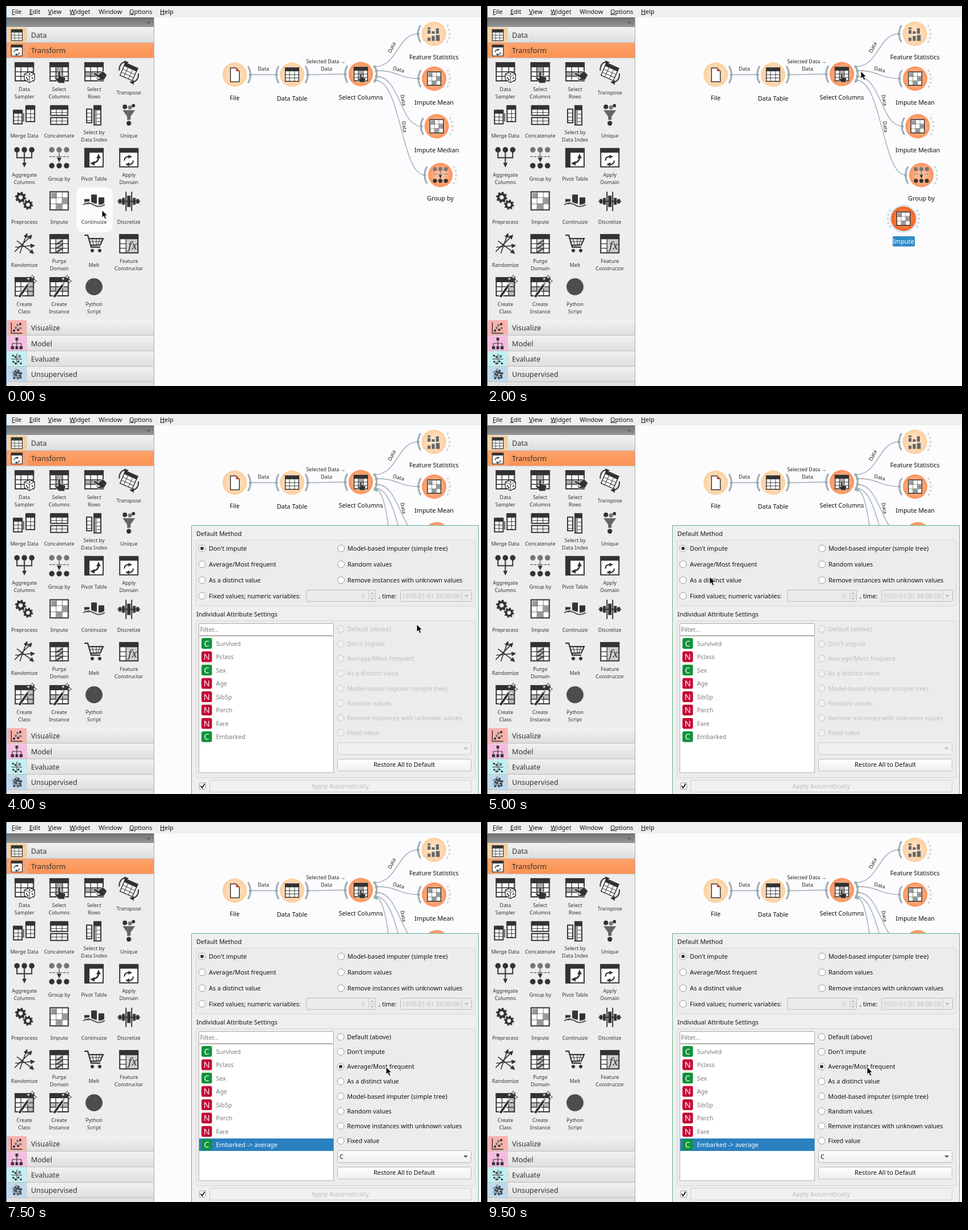
An HTML page for the animation above (10 s loop, 836 px wide and 670 px high).

```html
<!DOCTYPE html>
<html lang="en">
<head>
<meta charset="utf-8">
<title>Imputing a column in a workflow</title>
<style>
html, body { margin: 0; width: 100%; height: 100%; overflow: hidden; background: #fcfcfe; }
svg { display: block; width: 100vw; height: 100vh; }
text { font-family: "Noto Sans", "Open Sans", sans-serif; font-size: 10.86px; white-space: pre; }
.s { font-size: 9px; }
.cat { font-size: 12.6px; }
.m { text-anchor: middle; }
</style>
</head>
<body>
<svg id="stage" viewBox="0 0 836 670"></svg>
<script>
const K = '#333', GREY = '#9cacb4', OFF = '#bebebe', BLUE = '#308cc6';

const rect = (x, y, w, h, fill, more = '') => `<rect x="${x}" y="${y}" width="${w}" height="${h}" fill="${fill}" ${more}/>`;
const dot = (x, y, r, fill = K, more = '') => `<circle cx="${x}" cy="${y}" r="${r}" fill="${fill}" ${more}/>`;
const line = (d, stroke = K, w = 1, more = '') => `<path d="${d}" fill="none" stroke="${stroke}" stroke-width="${w}" ${more}/>`;
const shape = (d, fill = K, more = '') => `<path d="${d}" fill="${fill}" ${more}/>`;
const text = (x, y, s, fill = '#111', cls = '', more = '') => `<text x="${x}" y="${y}" fill="${fill}" class="${cls}" ${more}>${s}</text>`;
const put = (x, y, s, t = '') => `<g transform="translate(${x} ${y}) ${t}">${s}</g>`;
const group = (id, s) => `<g id="${id}">${s}</g>`;
const grad = (id, a, b, type = 'linear', dir = 'x2="0" y2="1"') =>
  `<${type}Gradient id="${id}" ${dir}><stop stop-color="${a}"/><stop offset="1" stop-color="${b}"/></${type}Gradient>`;

// Icons are drawn around the origin, about 34 px wide
const table = (inner = '', grid = 'M-16 0H16M-16 8H16M-6-8V16M6-8V16') =>
  rect(-16, -16, 32, 32, '#fff') + inner + line(grid, K, 1.3) +
  line('M-16-16H16V16H-16Z', K, 2) + rect(-17, -17, 34, 9, K);
const hand = shape('M-2-8q2-2 4 0v8l7 2q3 1 2 4l-2 7h-10l-7-9q0-3 3-1l3 2z', K, 'stroke="#fff" stroke-width=".7"');
const tip = (x, y, a) => put(x, y, shape('M0 0l-4-8h8z'), `rotate(${a})`);
const swap = line('M-9 1q0-9 10-8', K, 2.6) + tip(7, -7, -90) + line('M9 1q0 9-10 8', K, 2.6) + tip(-7, 9, 90);
const frame = rect(-16, -16, 32, 32, '#fff', `stroke="${K}" stroke-width="2"`) + rect(-17, -17, 34, 8, K);
const wand = line('M-9 18L9-7', '#fff', 6) + line('M-9 18L6-3', K, 4) + line('M6-3l3-4', '#999', 4) +
  [[7, -14], [14, -17], [18, -10]].map(([x, y]) => put(x, y, shape('M0-4L1-1 4 0 1 1 0 4-1 1-4 0-1-1z', '#fff', `stroke="${K}" stroke-width=".8"`))).join('');
const gear = (r) => dot(0, 0, r, 'none', `stroke="${K}" stroke-width="${r * .7}"`) +
  dot(0, 0, r * 1.45, 'none', `stroke="${K}" stroke-width="${r * .5}" stroke-dasharray="${r * .57}"`);
const three = (y, fill = K) => [-13, 0, 13].map(x => dot(x, y, 4.8, fill)).join('');
const bars = (list, fill = K) => list.map(([x, y, w, h]) => rect(x, y, w, h, fill)).join('');
const cells = (list) => list.map(([x, y]) => rect(x, y, 10, 10, '#999')).join('');

const icons = {
  table: table(),
  sampler: table() + put(9, 9, shape('M0-9L9-5V5L0 10-9 5V-5Z', '#fff', `stroke="${K}" stroke-width="1.4"`) +
    line('M-9-5L0-1 9-5M0-1V10', K, 1) + dot(0, -5, 1.4) + dot(-5, 2, 1.4) + dot(-3, 5, 1.4) + dot(5, 2, 1.4)),
  columns: table(rect(-6, -8, 12, 24, '#aaa')) + put(0, 7, hand),
  rows: table(rect(-16, 0, 32, 8, '#aaa')) + put(7, 7, hand, 'rotate(-60)'),
  transpose: put(0, 0, table(), 'rotate(24) scale(.74)') + line('M-17-2q0-15 13-16M17 3q0 14-12 16', K, 2) + tip(0, -17, -100) + tip(1, 18, 95),
  merge: rect(-19, -6, 15, 22, '#fff', `stroke="${K}" stroke-width="2"`) + rect(-20, -9, 17, 7, K) + line('M-11-3V16M-19 4H-4M-19 10H-4') +
    rect(3, -14, 15, 26, '#fff', `stroke="${K}" stroke-width="2"`) + rect(2, -17, 17, 8, K) + line('M11-9V12M3-2H18M3 5H18') + rect(-4, -3, 4, 15, '#777'),
  concat: rect(-15, -13, 30, 14, '#fff', `stroke="${K}" stroke-width="2"`) + rect(-16, -17, 32, 8, K) + line('M-5-9V1M5-9V1M-15-4H15') +
    rect(-15, 5, 30, 12, '#fff', `stroke="${K}" stroke-width="2"`) + line('M-5 5V17M5 5V17M-15 11H15'),
  index: rect(-13, -10, 9, 24, '#fff', `stroke="${K}" stroke-width="2"`) + line('M-13-3H-4M-13 4H-4M-13 10H-4') +
    rect(-1, -17, 14, 9, K) + rect(0, -9, 12, 27, '#fff', `stroke="${K}" stroke-width="2"`) + rect(1, -8, 4, 25, '#999') + line('M5-1H12M5 6H12M5 12H12'),
  unique: shape('M-11-8H11L3 3V9H-3V3Z', '#666') + dot(-7, -14, 4) + dot(2, -13, 3.6, '#777') + dot(8, -16, 3) + dot(0, 15, 4.2),
  aggregate: three(-14) + line('M-13-10V0H13V-10M0-10V12', K, 2) + tip(0, 17, 0),
  group: three(-14, '#777') + line('M-17-2H17', '#777', 1.6, 'stroke-dasharray="4 2"') + line('M0-9V4', '#777', 1.8) + tip(0, 8, 0) + three(14),
  pivot: frame + rect(-17, -17, 9, 34, K) + line('M-4 10Q9 8 8-3', K, 2.6) + tip(8, -7, 180) + tip(-7, 10, 90),
  domain: frame + put(0, 4, swap, 'scale(.85)'),
  gears: put(-6.5, -6, gear(5.8)) + put(6.5, 7, gear(5.2)),
  impute: rect(-16, -16, 32, 32, '#fff') + cells([[-14, -14], [5, -5], [-5, 5]]) + line('M-5.5-16V16M5.5-16V16M-16-5.5H16M-16 5.5H16', '#777') + line('M-16-16H16V16H-16Z', K, 2),
  continuize: bars([[-17, -3, 9, 9], [-5, -11, 10, 16], [8, -6, 10, 13]]) + line('M-19 5Q-10-1-1 5T19 5', '#eee', 2) + line('M-19 7Q-10 1-1 7T19 7', '#555', 2),
  discretize: bars([[-20, 0, 40, 2], [-18, -3, 5, 8], [-12, -5, 5, 12], [-6, -16, 2, 34], [-3, -9, 6, 20], [4, -16, 2, 34], [7, -5, 5, 12], [13, -3, 5, 8]]),
  random: line('M-17 14L12-14M-13-5L15 16M-16 6L16 3M-8 17L4-17', K, 1.6) + tip(14, -16, 225) + tip(17, 18, -48) + tip(19, 3, -95) + tip(5, -19, 200),
  purge: table(rect(-5, -8, 11, 24, '#ddd') + line('M-5 1L6-6M-5 8L6 1M-5 15L6 8', '#555', 3)),
  melt: line('M-17-15h6l6 21H11M-9-9H16L11 2-6 3', K, 2.2) + line('M-3-8L-1 2M4-8V2M10-8L7 2M-8-4H14', K, 1) + dot(-3, 12, 3) + dot(10, 12, 3),
  formula: table(rect(-5, -8, 22, 25, '#ccc'), 'M-16 0H-5M-16 8H-5M-5-8V16') +
    text(-1, 10, 'fx', K, '', 'style="font:italic 18px Noto Serif,serif"'),
  newClass: table(rect(5, -8, 11, 24, '#bbb')) + wand,
  newInstance: table(rect(-16, 0, 32, 8, '#bbb')) + wand,
  script: dot(0, 0, 15, '#4d4d4d'),
  file: shape('M-10-16H3L11-8V17H-10Z', '#fff', `stroke="${K}" stroke-width="2"`) + shape('M3-16V-8H11Z', '#c44'),
  stats: bars([[-15, -15, 7, 4], [-15, -9, 7, 9], [-5, -6, 7, 6], [5, -13, 7, 13], [-15, 9, 7, 8], [-5, 5, 7, 12], [5, 3, 9, 14]], '#666'),
  scatter: line('M-16-16V16H16', K, 2.5) + [[-8, 8], [-3, 0], [4, 6], [2, -8], [10, -11], [11, 1]].map(([x, y], i) => dot(x, y, 3.6, i % 2 ? '#777' : K)).join(''),
  tree: line('M0-12V0M-13 10V0H13V10M0 0V10', K, 1.8) + bars([[-4, -17, 8, 8], [-17, 8, 9, 9], [-4, 8, 8, 9], [8, 8, 9, 9]]),
  matrix: line('M-16 0H16M0-16V16', K, 1.6) + [[-11, -10], [-4, -6], [-10, 8], [-4, 13], [5, 7], [12, 13]].map(([x, y]) => dot(x, y, 3)).join('') + line('M4-12l8 8M12-12l-8 8', K, 2),
  cluster: Array.from({ length: 17 }, (_, i) => dot(3.6 * Math.sqrt(i) * Math.cos(i * 2.4), 3.6 * Math.sqrt(i) * Math.sin(i * 2.4), 3.4, i % 3 ? '#444' : '#8199ad')).join('')
};
const icon = (name, x, y, k = 1) => put(x, y, icons[name], `scale(${k})`);

// Toolbox
const tools = [
  ['sampler', 'Data|Sampler'], ['columns', 'Select|Columns'], ['rows', 'Select|Rows'], ['transpose', 'Transpose'],
  ['merge', 'Merge Data'], ['concat', 'Concatenate'], ['index', 'Select by|Data Index'], ['unique', 'Unique'],
  ['aggregate', 'Aggregate|Columns'], ['group', 'Group by'], ['pivot', 'Pivot Table'], ['domain', 'Apply|Domain'],
  ['gears', 'Preprocess'], ['impute', 'Impute'], ['continuize', 'Continuize'], ['discretize', 'Discretize'],
  ['random', 'Randomize'], ['purge', 'Purge|Domain'], ['melt', 'Melt'], ['formula', 'Feature|Constructor'],
  ['newClass', 'Create|Class'], ['newInstance', 'Create|Instance'], ['script', 'Python|Script']
];
const toolPos = (i) => [32.3 + 61.3 * (i % 4), 116 + 75.8 * Math.floor(i / 4)];
const tool = ([name, label], i) => {
  const [x, y] = toolPos(i), lines = label.split('|');
  return icon(name, x, y) + lines.map((s, n) => text(x, y + 40.3 + (n - (lines.length - 1) / 2) * 13, s, K, 's m')).join('');
};
const category = (y, name, label, tile, fill = 'url(#row)') =>
  rect(1, y, 259, 27, fill) + rect(2, y, 34, 26, tile) + line(`M1 ${y + 26.5}H260`, '#bdbdbd') +
  line(`M36.5 ${y}V${y + 26}`, '#c9c9c9', .7) + icon(name, 19, y + 13.5, .6) + text(44, y + 18, label, K, 'cat');

const menu = [[10, 'File', 1], [41, 'Edit', 1], [74, 'View', 1], [112, 'Widget', 1], [163, 'Window', 0], [217, 'Options', 1], [271, 'Help', 1]]
  .map(([x, s, u]) => text(x, 13.5, u ? `<tspan text-decoration="underline">${s[0]}</tspan>${s.slice(1)}` : s)).join('');

const toolbox = rect(0, 0, 836, 20, '#efefef') + menu +
  rect(0, 20, 261, 650, '#ededed') + rect(1, 20, 259, 17, 'url(#bar)') + text(248, 32, '«', '#444') +
  category(38, 'table', 'Data', '#f9cf9e') + category(65, 'domain', 'Transform', '#fda268', 'url(#orange)') +
  group('hover', rect(-32, -24, 64, 79, '#fcfcfc', 'rx="10"')) + tools.map(tool).join('') +
  category(554, 'scatter', 'Visualize', '#f9b2ac') + category(581.5, 'tree', 'Model', '#f6bce2') +
  category(609, 'matrix', 'Evaluate', '#c2f1f1') + category(636, 'cluster', 'Unsupervised', '#bfd9ee') +
  rect(1, 663, 259, 7, '#e2e2e2') + line('M260.5 20V670', '#aaa') + line('M.5 0V670', '#2c5375');

// Workflow canvas
const arc = (side, dotted) => {
  const d = `M${side * 24} -14A28 28 0 0 ${side > 0 ? 1 : 0} ${side * 24} 14`;
  return dotted ? line(d, '#d3d7db', 4, 'stroke-dasharray="0 7.3" stroke-linecap="round"') : line(d, GREY, 3, 'stroke-linecap="round"');
};
const node = (x, y, name, label, paint, left, right, ly = 45.5) =>
  put(x, y, (left ? arc(-1, left > 1) : '') + (right ? arc(1, right > 1) : '') + dot(0, 0, 21.5, `url(#${paint})`) +
    icon(name, 0, 0, .74) + (label ? text(0, ly, label, '#111', 'm') : ''));
const link = (x1, y1, x2, y2) => {
  const c = (x1 + x2) / 2 + 2;
  return line(`M${x1} ${y1}C${c} ${y1} ${c} ${y2} ${x2} ${y2}`, GREY, 1.4) + dot(x1, y1, 2.6, GREY) + dot(x2, y2, 2.6, GREY);
};
const tag = (x, y, a, s = 'Data') => put(x, y, text(0, 3, s, '#222', 's m'), `rotate(${a})`);

const canvas = rect(261, 20, 575, 650, '#fcfcfe') +
  link(430, 121, 476, 121) + link(531, 121, 597, 120) + link(649, 107, 725, 49) + link(652, 114, 726, 128) +
  link(652, 124, 731, 212) + link(650, 131, 737, 298) +
  tag(453, 111, 0) + tag(563, 98, 0, 'Selected Data →') + tag(564, 111, 0) +
  tag(679, 73, -63) + tag(691, 112, 16) + tag(699, 166, 79) + tag(701, 213, 82) +
  node(402.5, 121, 'file', 'File', 'pale', 0, 1, 44.5) + node(503.5, 121, 'table', 'Data Table', 'pale', 1, 1) +
  node(624.5, 120, 'columns', 'Select Columns', 'deep', 1, 1, 44.5) + node(753, 49, 'stats', 'Feature Statistics', 'pale', 1, 2, 44.5) +
  node(753.5, 128, 'impute', 'Impute Mean', 'deep', 1, 2) + node(758, 212, 'impute', 'Impute Median', 'deep', 1, 2) +
  node(764.5, 298, 'group', 'Group by', 'deep', 1, 2, 44.5) +
  group('drag', '') +
  group('added', dot(733, 375, 26, 'url(#glow)') + node(733, 375, 'impute', '', 'hot', 2, 2) +
    rect(714, 406, 39, 18, BLUE, 'rx="2"') + text(733, 419, 'Impute', '#fff', 'm')) +
  group('joined', put(733, 375, arc(-1)) + link(652, 134, 705, 377) + tag(671, 256, 84));

// Settings dialog
const methods = ["Don't impute", 'Average/Most frequent', 'As a distinct value', 'Model-based imputer (simple tree)', 'Random values', 'Remove instances with unknown values'];
const radio = (x, y, s, on, enabled = true) =>
  dot(x, y, 6, enabled ? '#fff' : '#f0f0f0', `stroke="${enabled ? '#999' : '#c4c4c4'}"`) + (on ? dot(x, y, 3, '#333') : '') +
  text(x + (x < 400 ? 12 : 11.3), y + 4, s, enabled ? '#111' : OFF);
const box = (x, y, w, h, fill, stroke = '#bcbcbc', r = 2) => rect(x + .5, y + .5, w, h, fill, `stroke="${stroke}" rx="${r}"`);
const arrow = (x, y, fill = OFF, k = 1) => shape(`M${x - 4} ${y - 2 * k}h8l-4 ${4 * k}z`, fill);
const attrs = ['Survived', 'Pclass', 'Sex', 'Age', 'SibSp', 'Parch', 'Fare', 'Embarked'];
const attrRow = (name, i) => {
  const y = 404.5 + 23.5 * i, cat = 'CN'[/Survived|Sex|Embarked/.test(name) ? 0 : 1];
  return rect(344, y - 9.5, 18.5, 19, cat === 'C' ? '#11923c' : '#c20a35', 'rx="3"') +
    text(353.2, y + 5.2, cat, '#fff', 'm', 'style="font-size:14.5px"') +
    text(369.5, y + 4, name, '#7d7d76', '', `id="attr${i}"`);
};

const dialog = rect(326.5, 196.5, 505, 480, '#efefef', 'stroke="#62b487"') +
  text(335, 215, 'Default Method') + box(334, 222, 491, 116, '#ececec', '#d4d4d4') +
  methods.slice(0, 3).map((s, i) => radio(345, 237 + 28 * i, s, !i)).join('') +
  methods.slice(3).map((s, i) => radio(589.7, 237 + 28 * i, s)).join('') +
  radio(345, 320.5, 'Fixed values; numeric variables:') +
  box(528, 310, 122, 20, '#ebebeb') + line('M638.5 311V330M638.5 320.5H650', '#ccc') + arrow(644.5, 316, OFF, -.8) + arrow(644.5, 326, OFF, .8) +
  text(632, 325, '0', OFF, '', 'text-anchor="end"') + text(656, 324.5, ', time:') +
  box(694, 310, 125, 20, '#ebebeb') + text(697, 325, '1970-01-01 08:00:00', OFF) + line('M802.5 311V330', '#ccc') + arrow(810.5, 321) +
  text(335, 357, 'Individual Attribute Settings') + box(334, 364, 491, 277, '#ececec', '#d4d4d4') +
  box(339, 369, 237, 21, '#fff', '#aaa', 1) + text(341.5, 384, 'Filter...', '#777') +
  box(339, 391, 237, 241, '#fff', '#b4b4b4', 0) + group('picked', rect(340, 558, 236.5, 22, '#2b80c0')) + attrs.map(attrRow).join('') +
  group('options', '') +
  box(583, 608, 235, 21, 'url(#button)') + text(701, 622, 'Restore All to Default', '#111', 'm') +
  box(340, 650, 11, 11, '#fff', '#999', 1) + line('M342.5 655.5l2.7 3.5 4.5-7', '#111', 1.8) +
  box(358, 645, 460, 21, '#f0f0f0', '#cdcdcd') + text(588, 660, 'Apply Automatically', OFF, 'm');

const options = (choice) => {
  const on = choice >= 0;
  return ['Default (above)', ...methods, 'Fixed value'].map((s, i) => radio(589, 379 + 26.15 * i, s, i === choice, on)).join('') +
    box(583, 579, 235, 21, on ? 'url(#button)' : '#f0f0f0', on ? '#b4b4b4' : '#cdcdcd') + arrow(809, 590, on ? '#555' : OFF) + (on ? text(587, 594, 'C') : '');
};

const $ = (id) => document.getElementById(id);
$('stage').innerHTML = '<defs>' + grad('row', '#f1f1f1', '#dedede') + grad('bar', '#707070', '#969696') + grad('orange', '#ffa36b', '#fb9152') +
  grad('button', '#fdfdfd', '#f0f0f0') + grad('pale', '#ffecd4', '#fccf9f', 'radial', '') + grad('deep', '#ffcdae', '#fb935c', 'radial', '') +
  grad('hot', '#ffae7a', '#f5611c', 'radial', '') +
  '<radialGradient id="glow"><stop offset=".75" stop-color="#a9c4e0"/><stop offset="1" stop-color="#a9c4e0" stop-opacity="0"/></radialGradient></defs>' +
  canvas + toolbox + group('dialog', dialog) +
  group('cursor', shape('M0 0V13L3 10.3 5.4 15.5 7.7 14.5 5.4 9.6H9.3Z', '#000', 'stroke="#fff" stroke-width=".8"'));

// Pointer position for each half second; the last one holds
const STEP = 500, LOOP = 10000;
const pointer = [[169, 360], [100, 348], [97, 347], [380, 240], [658, 115], [690, 250], [722, 368], [723, 371], [723, 371],
  [570, 330], [392, 287], [392, 420], [400, 567], [632, 459], [669, 432]];
const show = (id, on) => $(id).setAttribute('display', on ? 'inline' : 'none');
const move = (id, [x, y]) => $(id).setAttribute('transform', `translate(${x} ${y})`);

function draw(step) {
  const at = pointer[Math.min(step, pointer.length - 1)];
  const picked = step >= 12, averaged = step >= 14;
  move('cursor', at);
  move('hover', toolPos(step ? 13 : 14).map((v, i) => i ? v + 0.5 : v + 1));
  show('hover', step < 3);
  show('added', step >= 2);
  show('joined', step >= 6);
  $('drag').innerHTML = step === 5 ? link(652, 134, ...at) : '';
  show('dialog', step >= 8);
  show('picked', picked);
  $('attr7').textContent = averaged ? 'Embarked -> average' : 'Embarked';
  $('attr7').setAttribute('fill', picked ? '#fff' : '#7d7d76');
  $('options').innerHTML = options(averaged ? 2 : picked ? 0 : -1);
}

const start = performance.now();
let last = -1;
function tick() {
  const step = Math.floor((performance.now() - start) % LOOP / STEP);
  if (step !== last) draw(last = step);
  requestAnimationFrame(tick);
}
tick();
</script>
</body>
</html>
```
